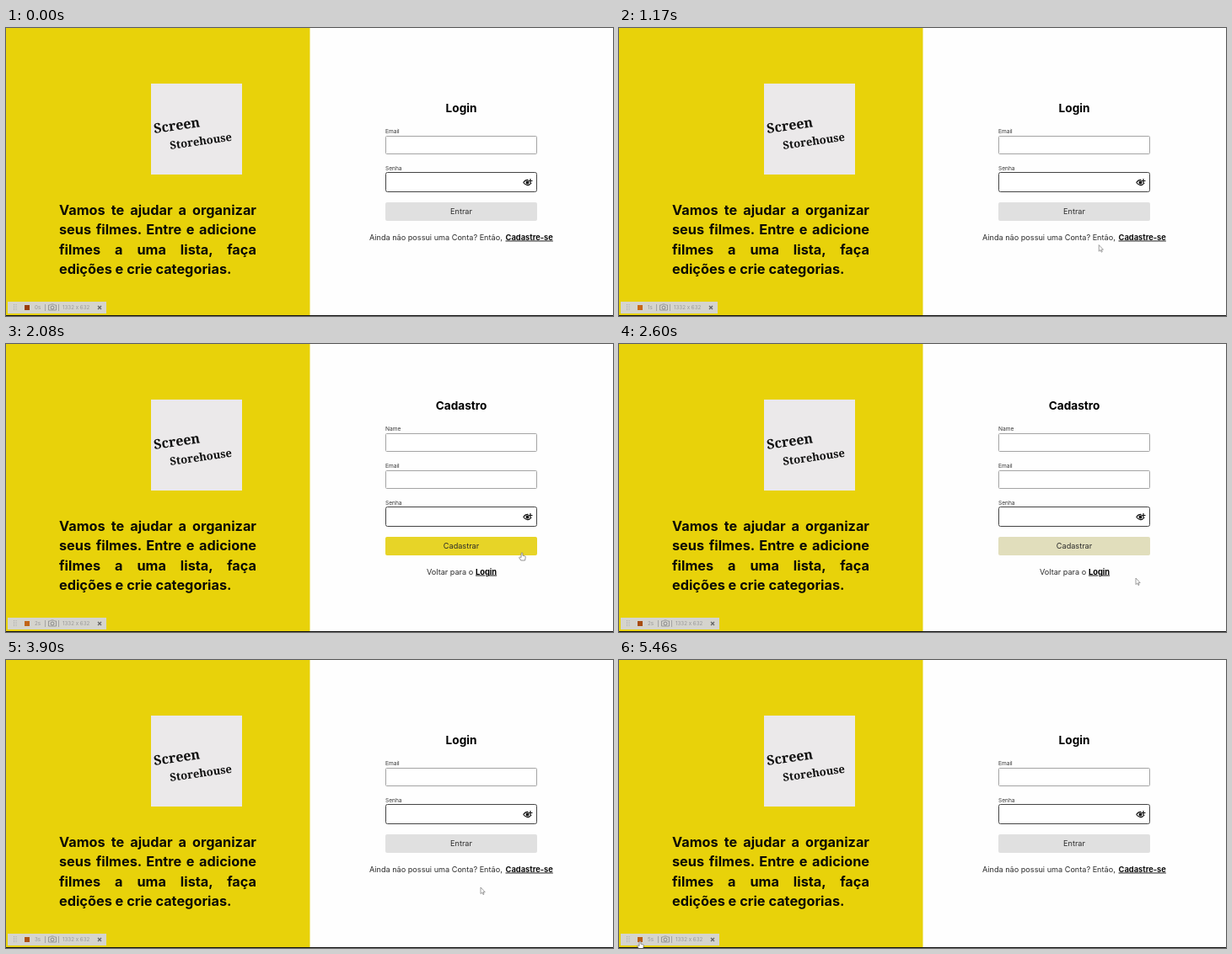
An HTML page for the animation above (5590 ms loop, 720x342 px).

```html
<!DOCTYPE html>
<html lang="pt">
<head>
<meta charset="utf-8">
<style>
html, body { margin: 0; width: 100%; height: 100%; overflow: hidden; background: #fefefe; }
body { position: relative; font-family: Inter, sans-serif; }
svg { position: absolute; left: 0; top: 0; }
p {
  position: absolute; left: 63px; top: 205.4px; width: 234px; margin: 0;
  font: 700 16.3px/23.1px Inter, sans-serif; color: #0b0b05;
}
p span { display: block; text-align: justify; text-align-last: justify; }
p span:last-child { text-align-last: left; white-space: nowrap; }
.title { font-size: 13.6px; font-weight: 700; text-anchor: middle; }
.label { font-size: 6.6px; fill: #333; }
.body { font-size: 9.15px; fill: #2a2a2a; }
.link { font-size: 9.3px; font-weight: 700; text-decoration: underline; }
.mid { text-anchor: middle; }
.name { font-family: "Noto Serif", serif; font-weight: 700; fill: #111; }
</style>
</head>
<body>
<svg width="720" height="342" viewBox="0 0 720 342">
  <rect width="360.5" height="342" fill="#e8d20a"/>
  <rect x="172" y="66" width="108" height="108" fill="#ebe9ea"/>
  <g class="name">
    <text transform="translate(176 125) rotate(-8)" font-size="16">Screen</text>
    <text transform="translate(195 144) rotate(-8)" font-size="13">Storehouse</text>
  </g>
  <g id="login"></g>
  <g id="signup"></g>
  <rect y="341" width="720" height="1" fill="#111"/>
  <g id="bar" font-size="6.2" fill="#989898">
    <rect id="barBack" x="2" y="325" height="14" fill="#d5d4ce"/>
    <path d="M9.5 328v8M12 328v8" stroke="#aaa" stroke-dasharray="1 1"/>
    <rect id="light" x="22" y="329" width="6" height="6"/>
    <text id="seconds" x="34" y="334.3"></text>
    <g id="tools">
      <path d="M46.5 328v8M62.5 328v8" stroke="#999" stroke-width=".8"/>
      <path d="M50.5 329h2l1-1h3l1 1h2v6h-9z" fill="none" stroke="#888" stroke-width=".8"/>
      <circle cx="55" cy="332" r="2" fill="none" stroke="#888"/>
      <text x="67" y="334.3">1332 x 632</text>
      <path d="M109 330l4 4m0-4l-4 4" stroke="#666" stroke-width="1.3"/>
    </g>
  </g>
  <path id="arrow" d="M0 0V7.6L1.8 6 3 8.6 4.1 8 2.9 5.6H5.2Z" fill="#fff" stroke="#777" stroke-width=".7"/>
  <path id="hand" d="M-.9 .4Q0-.7 .9 .4V3.2L3.8 4Q4.4 4.3 4.2 5.5L3.6 9H-1.2L-3.3 5.8Q-3 4.2-.9 5.4Z" fill="#fff" stroke="#666" stroke-width=".7"/>
</svg>
<p><span>Vamos te ajudar a organizar</span><span>seus filmes. Entre e adicione</span><span>filmes a uma lista, faça</span><span>edições e crie categorias.</span></p>
<script>
const LOOP = 5590, STEP = 130;
const OPEN_SIGNUP = 1820, OPEN_LOGIN = 3510, LEAVE_BUTTON = 2350, FADE = 300;
const $ = id => document.getElementById(id);

const eye = y => `<g transform="translate(618.5 ${y + 11})" fill="none" stroke="#111" stroke-width="1.2">
  <path d="M-4.8 .5Q-2.5-3 1-2.6M4.7 .8Q0 6.6-4.8 .5"/><circle cy=".6" r="1.4" fill="#111"/>
  <path d="M3.5-4V1M1-1.5H6"/></g>`;

const field = (label, y) => {
  const secret = label === 'Senha';
  const box = secret
    ? `y="${y - 1}" height="23" rx="2" stroke="#444"`
    : `y="${y}" height="21" rx="1" stroke="#a4a4a4"`;
  return `<text class="label" x="450" y="${y - 3.5}">${label}</text>
    <rect x="450.5" width="179" fill="#fff" ${box}/>${secret ? eye(y - .5) : ''}`;
};

const page = (title, top, labels, action, note, noteX, link, linkX) => {
  const buttonY = top + 28 + labels.length * 44;
  return `<text class="title" x="540" y="${top + 4.5}">${title}</text>
    ${labels.map((label, i) => field(label, top + 33 + i * 44)).join('')}
    <rect class="button" x="450" y="${buttonY - 4.5}" width="180" height="22" rx="2" fill="#e0e0e0"/>
    <text class="body mid" x="540" y="${buttonY + 9.5}">${action}</text>
    <text class="body" x="${noteX}" y="${buttonY + 40}">${note}</text>
    <text class="link" x="${linkX}" y="${buttonY + 40}">${link}</text>`;
};

$('login').innerHTML = page('Login', 95.5, ['Email', 'Senha'], 'Entrar',
  'Ainda não possui uma Conta? Então,', 431, 'Cadastre-se', 592.5);
$('signup').innerHTML = page('Cadastro', 73.5, ['Name', 'Email', 'Senha'], 'Cadastrar',
  'Voltar para o', 499, 'Login', 557);
const signupButton = document.querySelector('#signup .button');
const loginLink = document.querySelector('#login .link');

// Pointer stops: time, x, y
const stops = [
  [130, 300, 335], [650, 447, 285], [1430, 612, 248], [2250, 612, 248], [2500, 613, 278],
  [2730, 613, 278], [3250, 567, 270], [3510, 567, 270], [3900, 563, 270],
  [4030, 563, 270], [4810, 52, 318], [5330, 25, 334], [LOOP, 25, 334]
];

const clamp = v => Math.max(0, Math.min(1, v));
const mix = (a, b, k) => `rgb(${a.map((v, i) => Math.round(v + (b[i] - v) * k))})`;
const show = (node, on) => node.setAttribute('visibility', on ? 'visible' : 'hidden');

function pointerAt(t) {
  const i = Math.max(1, stops.findIndex(s => s[0] > t));
  const [t0, x0, y0] = stops[i - 1], [t1, x1, y1] = stops[i];
  const u = clamp((t - t0) / (t1 - t0)), k = u * u * (3 - 2 * u);
  return [x0 + (x1 - x0) * k, y0 + (y1 - y0) * k];
}

function draw(t) {
  const signup = t >= OPEN_SIGNUP && t < OPEN_LOGIN;
  show($('login'), !signup);
  show($('signup'), signup);

  const hover = clamp((t - OPEN_SIGNUP) / FADE) * (1 - clamp((t - LEAVE_BUTTON) / FADE));
  signupButton.setAttribute('fill', mix([224, 224, 224], [232, 210, 10], hover));

  const [x, y] = pointerAt(t);
  const onLink = !signup && x > 592 && y < 253;
  const onButton = signup && t < LEAVE_BUTTON;
  const onReturn = signup && x < 581 && y < 275;
  const hand = onLink || onButton || onReturn || t >= 5330;
  loginLink.setAttribute('fill', onLink ? '#14143c' : '#111');
  for (const id of ['arrow', 'hand']) {
    $(id).setAttribute('transform', `translate(${x} ${y})`);
    show($(id), t >= STEP && (id === 'hand') === hand);
  }

  const second = Math.floor(t / 1000), shift = second === 1 ? -2 : 0;
  $('seconds').textContent = second + 's';
  $('barBack').setAttribute('width', 117 + shift);
  $('tools').setAttribute('transform', `translate(${shift})`);
  const glow = (1 + Math.cos((t - 1560) / 3250 * 2 * Math.PI)) / 2;
  $('light').setAttribute('fill', mix([152, 62, 12], [206, 112, 28], glow));
}

const start = performance.now();
function tick() {
  const t = (performance.now() - start) % LOOP;
  draw(Math.floor(t / STEP) * STEP);
  requestAnimationFrame(tick);
}
tick();
</script>
</body>
</html>
```
